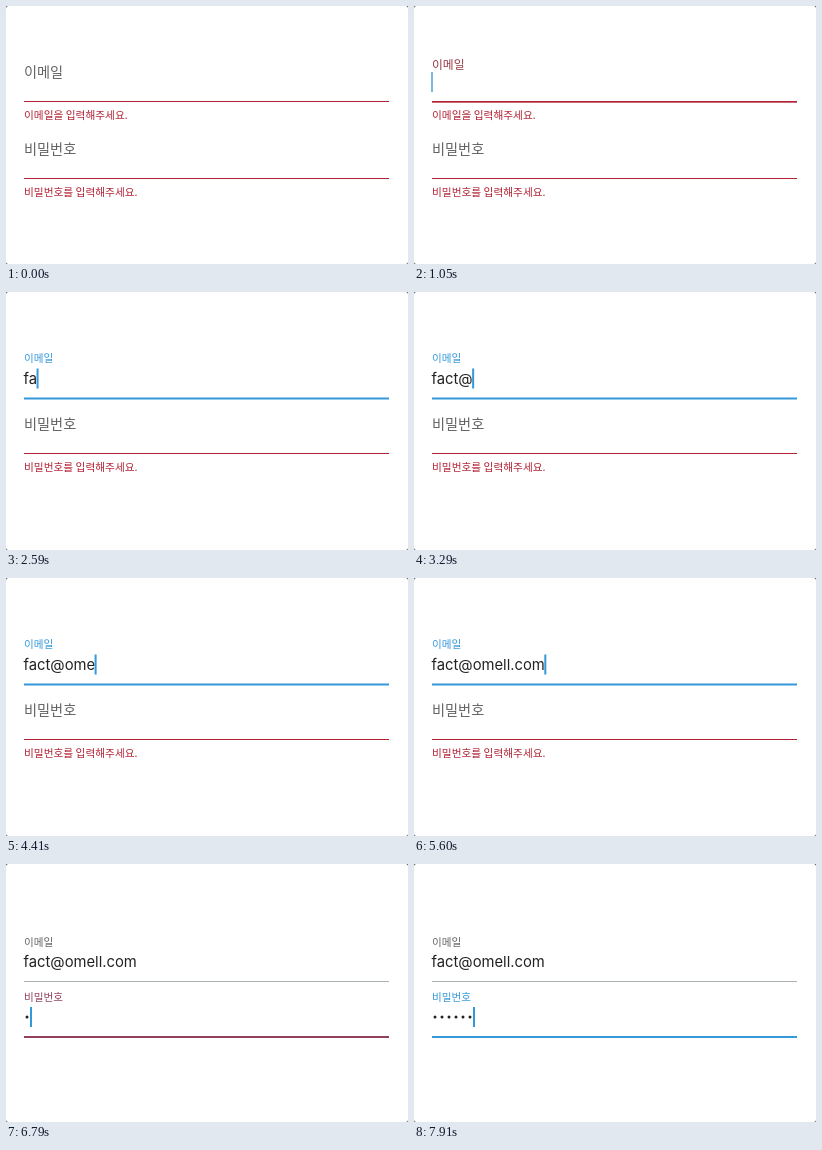
Animation, 402 px wide and 258 px high, one loop 8000 ms. Source, as an HTML page with a canvas:

```html
<!DOCTYPE html>
<html lang="ko">
<head>
<meta charset="utf-8">
<style>
  html, body { margin: 0; width: 100%; height: 100%; overflow: hidden; background: #fff; }
  canvas { display: block; }
</style>
</head>
<body>
<canvas id="stage" width="402" height="258"></canvas>
<script>
const ctx = document.getElementById('stage').getContext('2d');
const LOOP = 8000, TICK = 70;
const GREY = [98, 98, 98], RULE = [172, 180, 174], RED = [178, 34, 52], BLUE = [52, 152, 219];
const HANGUL = '"Noto Sans CJK KR", "Noto Sans CJK", sans-serif';
const LATIN = 'Inter, sans-serif';

const EMAIL = 'fact@omell.com';
const EMAIL_KEYS = [2240, 2590, 2730, 2940, 3290, 3570, 3850, 4410, 4480, 4620, 4900, 5180, 5250, 5600];
const PASSWORD_KEYS = [6580, 6930, 7210, 7420, 7630, 7910];

const lerp = (a, b, p) => a + (b - a) * p;
const mix = (a, b, p) => a.map((v, i) => lerp(v, b[i], p));
const rgb = (c, alpha = 1) => `rgba(${c.map(Math.round)},${alpha})`;
// Share of a transition whose first visible tick is at a and last at b.
const ramp = (t, a, b) => Math.min(1, Math.max(0, (t - a + TICK) / (b - a + TICK)));
const typed = (keys, t) => keys.filter(k => k <= t).length;

function text(str, x, y, size, family, color, alpha) {
  ctx.font = `${size}px ${family}`;
  ctx.fillStyle = rgb(color, alpha);
  ctx.fillText(str, x, y);
}

function field({ y, label, helper, float, active, valid, error, caretX, caret }) {
  const errorColor = mix(RED, BLUE, valid);
  const labelColor = mix(GREY, errorColor, Math.min(float, active));
  const ruleColor = mix(valid ? RULE : RED, errorColor, active);

  text(label, 18, lerp(y - 24, y - 35.5, float), lerp(14.2, 10.6, float), HANGUL, labelColor);
  ctx.fillStyle = rgb(ruleColor);
  ctx.fillRect(18, y, 365, lerp(1, 2, active));
  if (error > 0) text(helper, 18, y + 18, 10.7, HANGUL, RED, error);
  if (caret > 0) {
    ctx.fillStyle = rgb(BLUE, caret);
    ctx.fillRect(caretX, y - 29, 2, 20);
  }
}

function draw(t) {
  const emailFocus = ramp(t, 980, 1120);
  const emailOk = ramp(t, 2240, 2380);
  const switched = ramp(t, 6020, 6160);
  const passwordFilled = ramp(t, 6580, 6720);
  const passwordOk = ramp(t, 6790, 7000);
  const blink = 1 - ramp(t, 1540, 1680) + ramp(t, 1890, 2030);
  const emailY = 95 + 10.5 * emailOk + 11.5 * passwordFilled;
  const passwordY = 172 - 11 * emailOk + 11 * passwordFilled;

  ctx.fillStyle = '#555';
  ctx.fillRect(0, 0, 402, 258);
  ctx.fillStyle = '#fff';
  ctx.beginPath();
  ctx.roundRect(0, 0, 402, 258, 2.5);
  ctx.fill();

  const value = EMAIL.slice(0, typed(EMAIL_KEYS, t));
  text(value, 17.5, emailY - 14, 14.8, LATIN, [34, 34, 34]);
  const valueWidth = ctx.measureText(value).width;
  field({
    y: emailY, label: '이메일', helper: '이메일을 입력해주세요.',
    float: emailFocus, active: emailFocus - switched, valid: emailOk, error: 1 - emailOk,
    caretX: 17 + valueWidth, caret: t < 6020 ? emailFocus * blink : 0
  });

  const dots = typed(PASSWORD_KEYS, t);
  ctx.fillStyle = '#222';
  for (let i = 0; i < dots; i++) {
    ctx.beginPath();
    ctx.arc(21 + 7 * i, passwordY - 19, 1.5, 0, 2 * Math.PI);
    ctx.fill();
  }
  field({
    y: passwordY, label: '비밀번호', helper: '비밀번호를 입력해주세요.',
    float: switched, active: switched, valid: passwordOk, error: 1 - passwordFilled,
    caretX: 17 + 7 * dots, caret: switched
  });
}

function frame() {
  const t = performance.now() % LOOP;
  draw(Math.floor(t / TICK) * TICK);
  requestAnimationFrame(frame);
}
frame();
</script>
</body>
</html>
```
